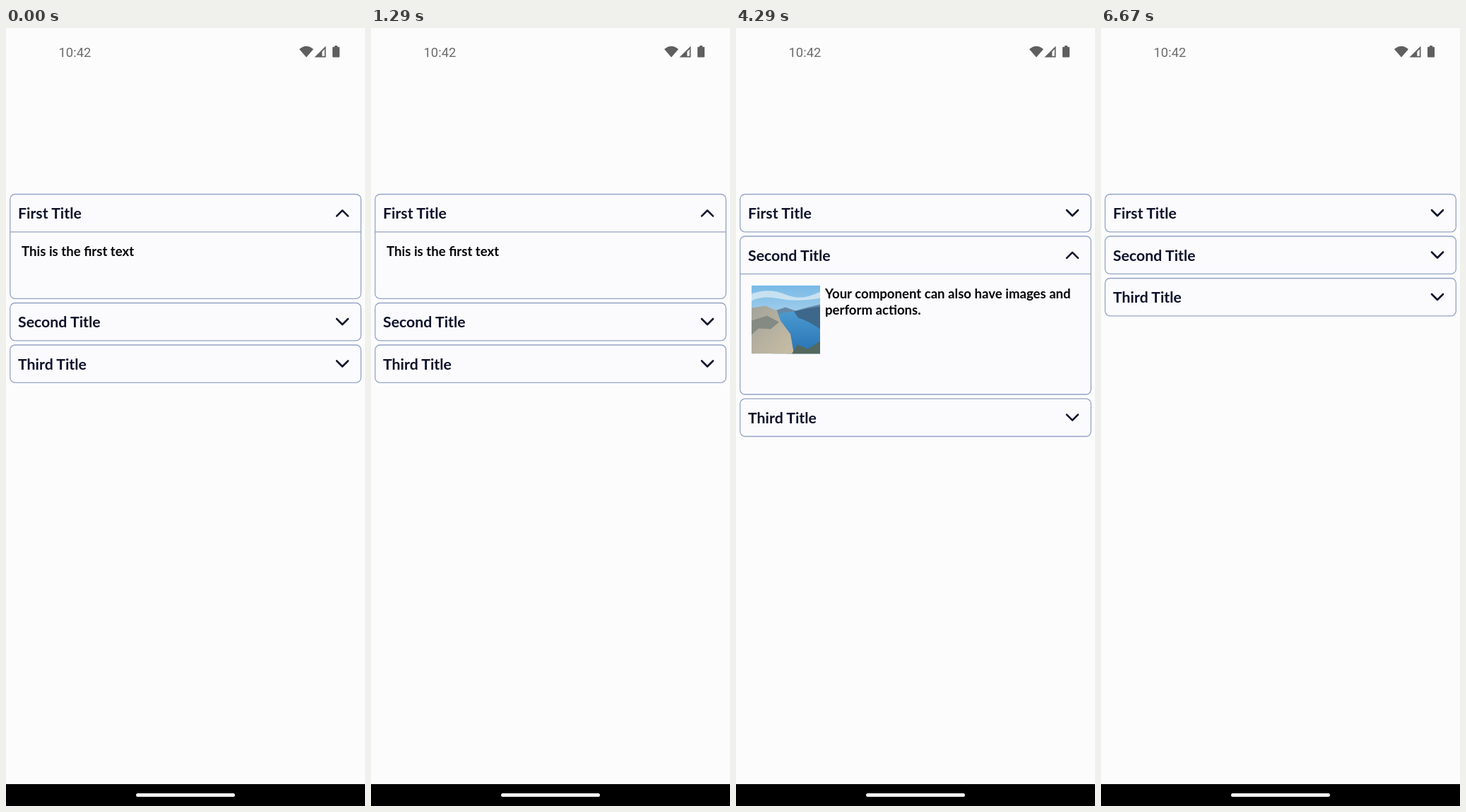
These frames come from a looping animation (508 by 1102 pixels, 6790 ms). An HTML page:

```html
<!DOCTYPE html>
<html lang="en">
<head>
<meta charset="utf-8">
<title>Accordion</title>
<style>
  html, body { margin: 0; width: 100%; height: 100%; overflow: hidden; background: #fcfcfd; }
  svg { display: block; width: 100%; height: 100%; }
  text { font-family: Lato, sans-serif; font-weight: 700; }
  .title { font-size: 21.3px; fill: #0d1229; }
  .body { font-size: 18.6px; fill: #050507; }
  .line { fill: none; stroke: #94a4c3; stroke-width: 1.3; }
  .box { fill: #fbfbfe; }
  .arrow { fill: none; stroke: #0d1229; stroke-width: 2.6; stroke-linecap: round; stroke-linejoin: round; }
  .clock { font: 400 18.4px Roboto, sans-serif; fill: #6c6c6c; }
</style>
</head>
<body>
<svg viewBox="0 0 508 1102">
  <rect width="508" height="1102" fill="#fcfcfd"/>
  <text class="clock" x="74.5" y="40.7">10:42</text>
  <g fill="#5f5f5f">
    <path d="M415 30Q425 21.5 435 30L425 41.5Z"/>
    <path fill-rule="evenodd" d="M436.5 41.5L452.5 25.5V41.5ZM447.3 33.5V39.8H450.8V30Z"/>
    <path d="M465 25h4v1.8h2q1 0 1 1V40.5q0 1-1 1h-8q-1 0-1-1V27.8q0-1 1-1h2Z"/>
  </g>

  <g id="list"></g>

  <g id="photo">
    <defs>
      <linearGradient id="sky" x2="0" y2="1">
        <stop stop-color="#78b9e6"/><stop offset="1" stop-color="#dcebf3"/>
      </linearGradient>
      <linearGradient id="water" x2="0" y2="1">
        <stop stop-color="#4a9ad0"/><stop offset="1" stop-color="#2872b4"/>
      </linearGradient>
      <linearGradient id="rock" x2="1" y2="1">
        <stop stop-color="#a3a39b"/><stop offset="1" stop-color="#c9bea4"/>
      </linearGradient>
    </defs>
    <svg x="22" y="364.5" width="97" height="97" viewBox="0 0 97 97">
      <rect width="97" height="97" fill="url(#sky)"/>
      <path d="M0 12Q25 3 48 13T97 9V18Q65 24 40 19T0 22Z" fill="#e4f0f6" opacity=".7"/>
      <path d="M30 37L48 31L62 36L80 31L97 27V97H30Z" fill="#6688a6"/>
      <path d="M38 40L60 37Q68 48 97 54V97H50Z" fill="url(#water)"/>
      <path d="M60 37L78 33L97 30V62Q82 51 66 46Z" fill="#3d688b"/>
      <path d="M0 32L20 29L36 36L41 50L55 69L60 97H0Z" fill="url(#rock)"/>
      <path d="M0 50L22 43L39 52L27 62L10 61L0 70Z" fill="#858b83"/>
      <path d="M57 97L65 84L80 90L97 79V97Z" fill="#53685e"/>
    </svg>
  </g>

  <rect y="1071" width="508" height="31" fill="#000"/>
  <rect x="184" y="1084" width="140" height="5" rx="2.5" fill="#f2f2f2"/>
</svg>

<script>
const LOOP = 6790, TOP = 235.5, HEAD = 53.3, PITCH = 59.5;
const OPEN_SECOND = 2600, PHOTO = 3650, FADE = 300, OPEN_THIRD = 4600, CLOSE = 6340;

const items = [
  { title: "First Title", body: 94.5, x: 22, lines: ["This is the first text"] },
  { title: "Second Title", body: 170.7, x: 126,
    lines: ["Your component can also have images and", "perform actions."] },
  { title: "Third Title", body: 94.5, x: 22, lines: ["This is the third text"] }
];

const list = document.getElementById("list");
const photo = document.getElementById("photo");

list.innerHTML = items.map(({ title, x, lines }) => `<g>
  <rect class="line box" x="5.8" width="496.5" rx="7"/>
  <text class="title" x="17" y="34.7">${title}</text>
  <path class="arrow"/>
  <g class="content">
    <path class="line" d="M6 ${HEAD}H502"/>
    ${lines.map((s, i) => `<text class="body" x="${x}" y="${87.6 + i * 23}">${s}</text>`).join("")}
  </g>
</g>`).join("");

const panels = [...list.children];

function layout(open) {
  let y = TOP;
  panels.forEach((panel, i) => {
    const on = i === open, extra = on ? items[i].body : 0;
    panel.setAttribute("transform", `translate(0 ${y})`);
    panel.querySelector(".box").setAttribute("height", HEAD + extra);
    panel.querySelector(".arrow").setAttribute("d",
      on ? "M468 30.8L476 22.8L484 30.8" : "M468 22.5L476 30.5L484 22.5");
    panel.querySelector(".content").style.display = on ? "" : "none";
    y += PITCH + extra;
  });
}

function openAt(t) {
  if (t < OPEN_SECOND) return 0;
  if (t < OPEN_THIRD) return 1;
  return t < CLOSE ? 2 : -1;
}

function draw(now) {
  const t = now % LOOP, open = openAt(t);
  layout(open);
  photo.style.opacity = open === 1 ? Math.min(1, Math.max(0, (t - PHOTO) / FADE)) : 0;
  requestAnimationFrame(draw);
}
draw(0);
</script>
</body>
</html>
```
